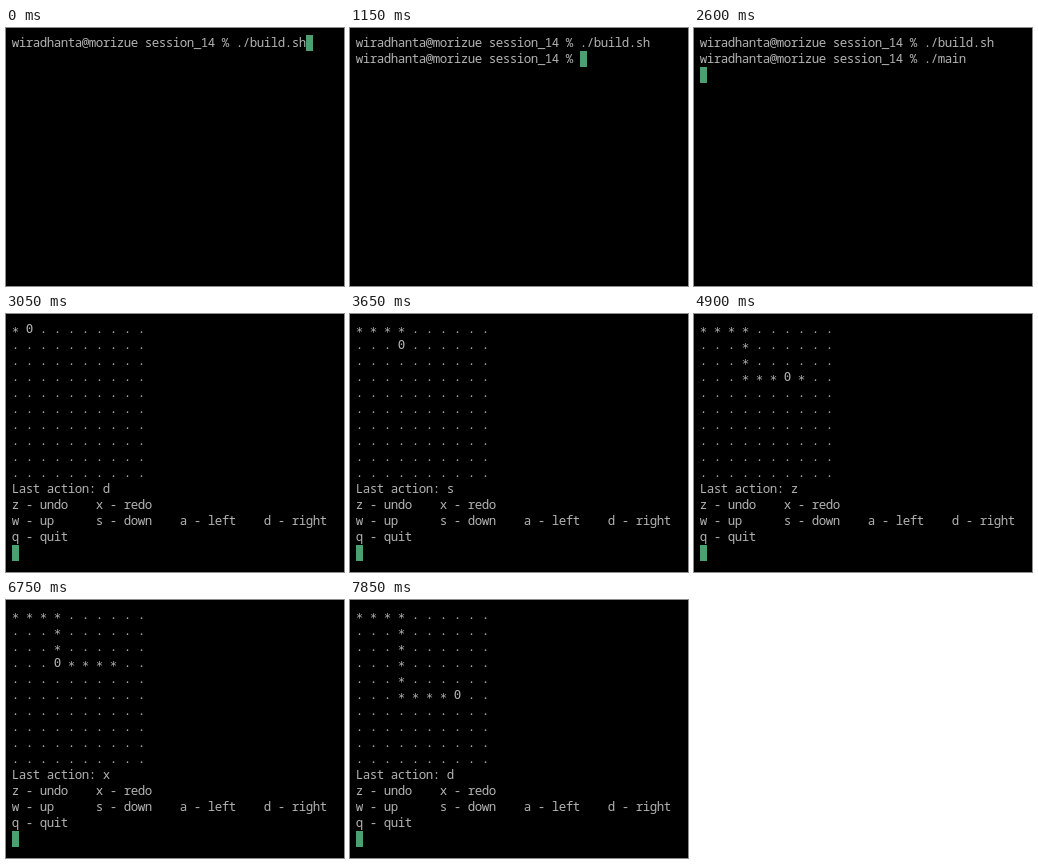
Write an HTML page that moves like this. It is 338 px wide and 258 px high and loops after 8 s.

```html
<!DOCTYPE html>
<html lang="en">
<head>
<meta charset="utf-8">
<title>Terminal grid game</title>
<style>
  html, body { margin: 0; width: 100%; height: 100%; overflow: hidden; background: #000; }
  svg { display: block; width: 100%; height: 100%; }
  text { white-space: pre; fill: #b2b2b2; font: 12.5px "Noto Sans Mono", "DejaVu Sans Mono", monospace; letter-spacing: -0.5px; }
  .mark { font-family: "DejaVu Sans Mono", monospace; letter-spacing: -0.525px; }
</style>
</head>
<body>
<svg id="stage" viewBox="0 0 338 258">
  <rect width="338" height="258" fill="#000"/>
  <rect id="cursor" width="7" height="16" fill="#4b9f70"/>
</svg>
<script>
const LOOP = 8000, CELL = 7, LINE = 16, LEFT = 6, TOP = 7, BASE = 12, SIZE = 10;
const PROMPT = "wiradhanta@morizue session_14 % ";
const BUILD = PROMPT + "./build.sh";
const RUN = "./main";
const HELP = [
  "z - undo    x - redo",
  "w - up      s - down    a - left    d - right",
  "q - quit"
];

// Shell timing in ms
const BUILD_ENTER = 550, PROMPT_BACK = 1000, TYPE_START = 1300, TYPE_STEP = 150;
const RUN_ENTER = 2450, GAME_START = 2650;

// Key presses: key, then the times it is hit
const KEYS = [
  ["d", 3050, 3250, 3450],
  ["s", 3600, 3750, 3900],
  ["d", 4050, 4200, 4350, 4500],
  ["z", 4900, 5050, 5250, 5400, 5550, 5750, 5950],
  ["x", 6450, 6600, 6750],
  ["s", 7050, 7250],
  ["d", 7400, 7550, 7700, 7850]
].flatMap(([key, ...times]) => times.map(at => ({ key, at })));
const STEP = { w: [0, -1], s: [0, 1], a: [-1, 0], d: [1, 0] };

const stage = document.getElementById("stage");
const cursor = document.getElementById("cursor");

function addText(row, shift = 0, className = "") {
  const el = document.createElementNS("http://www.w3.org/2000/svg", "text");
  // Half the tightened spacing keeps each glyph centred in its cell
  el.setAttribute("x", LEFT - 0.25);
  el.setAttribute("y", TOP + row * LINE + BASE + shift);
  el.setAttribute("class", className);
  return stage.appendChild(el);
}

const rows = Array.from({ length: 14 }, (_, r) => addText(r));
const stars = Array.from({ length: SIZE }, (_, r) => addText(r, 3, "mark"));
const players = Array.from({ length: SIZE }, (_, r) => addText(r, 0, "mark"));

function setText(el, text = "") {
  const fixed = text.replace(/ /g, "\u00a0");
  if (el.textContent !== fixed) el.textContent = fixed;
}

function shellLines(t) {
  if (t < BUILD_ENTER) return [BUILD];
  if (t < PROMPT_BACK) return [BUILD, ""];
  const typed = Math.max(0, Math.floor((t - TYPE_START) / TYPE_STEP) + 1);
  const lines = [BUILD, PROMPT + RUN.slice(0, typed)];
  if (t >= RUN_ENTER) lines.push("");
  return lines;
}

function playGame(t) {
  const path = [[0, 0]];
  let pos = 0, last = "";
  for (const { key, at } of KEYS) {
    if (at > t) break;
    last = key;
    if (key === "z") pos--;
    else if (key === "x") pos++;
    else {
      // A new move drops whatever could still be redone
      const [x, y] = path[pos], [dx, dy] = STEP[key];
      path.length = ++pos;
      path.push([x + dx, y + dy]);
    }
  }
  const board = Array.from({ length: SIZE }, () => Array(SIZE).fill("."));
  for (const [x, y] of path) board[y][x] = "*";
  const [px, py] = path[pos];
  board[py][px] = "0";
  return { board, last };
}

function draw(t) {
  let lines, board = [];
  if (t < GAME_START) {
    lines = shellLines(t);
  } else {
    const game = playGame(t);
    board = game.board;
    lines = [
      ...board.map(r => r.map(c => c === "." ? c : " ").join(" ")),
      "Last action: " + game.last, ...HELP, ""
    ];
  }
  const layer = (r, mark) =>
    board[r] && board[r].includes(mark) ? board[r].map(c => c === mark ? c : " ").join(" ") : "";
  rows.forEach((el, r) => setText(el, lines[r]));
  stars.forEach((el, r) => setText(el, layer(r, "*")));
  players.forEach((el, r) => setText(el, layer(r, "0")));

  const end = lines.length - 1;
  cursor.setAttribute("x", LEFT + lines[end].length * CELL);
  cursor.setAttribute("y", TOP + end * LINE);
}

const start = performance.now();
function tick() {
  draw((performance.now() - start) % LOOP);
  requestAnimationFrame(tick);
}
tick();
</script>
</body>
</html>
```
